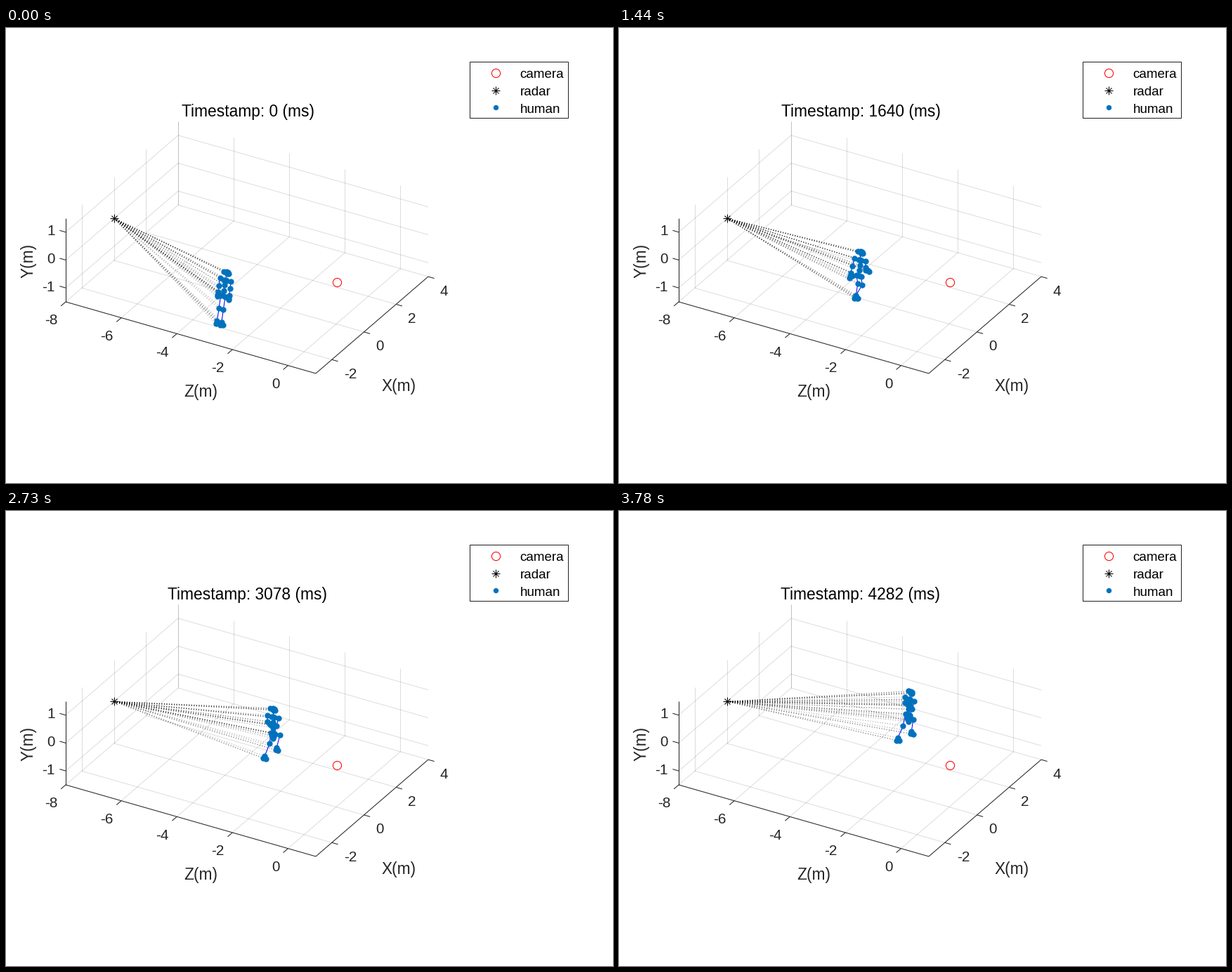
Write a matplotlib script that moves like this. It is 864 by 648 pixels and loops after 3810 ms.

```python
import numpy as np
import matplotlib
import matplotlib.pyplot as plt
from matplotlib.animation import FuncAnimation
from matplotlib.collections import LineCollection
from matplotlib.patches import Rectangle

matplotlib.rcParams["font.family"] = "Liberation Sans"

W, H = 864, 648
FRAMES, INTERVAL = 127, 30
INK, BLUE = "#262626", "#0072BD"

# Screen pixels per metre along the axes of the plot
FWD = np.array([22.86, -19.7])     # X
SIDE = np.array([39.55, 11.33])    # Z
RISE = np.array([0.0, -39.7])      # Y
DOWN = np.array([-5.0, 39.0])      # body axis, slightly tilted
CORNER = np.array([85.0, 390.0])

fig = plt.figure(figsize=(W / 72, H / 72), dpi=72, facecolor="white")
ax = fig.add_axes([0, 0, 1, 1])
ax.set_xlim(0, W)
ax.set_ylim(H, 0)
ax.axis("off")


def project(x, y, z):
    return CORNER + (z + 8) * SIDE + (x + 3) * FWD + (y + 1.5) * RISE


def lines(segments, color, width=1.04, **kw):
    return ax.add_collection(LineCollection(segments, colors=color, linewidths=width, **kw))


def label(x, y, text, size=20.8, color=INK, **kw):
    return ax.text(x, y, text, fontsize=size, color=color, va="baseline", **kw)


def draw_axes():
    grid, ticks = [], []
    tick_x = SIDE / np.hypot(*SIDE) * 9
    tick_z = -FWD / np.hypot(*FWD) * 9
    for x in (-2, 0, 2, 4):
        grid += [(project(x, -1.5, -8), project(x, -1.5, 1)),
                 (project(x, -1.5, -8), project(x, 1.5, -8))]
        p = project(x, -1.5, 1)
        ticks.append((p, p + tick_x))
        label(p[0] + 17, p[1] + 26.5, str(x))
    for z in (-8, -6, -4, -2, 0):
        grid += [(project(-3, -1.5, z), project(4, -1.5, z)),
                 (project(4, -1.5, z), project(4, 1.5, z))]
        p = project(-3, -1.5, z)
        ticks.append((p, p + tick_z))
        label(p[0] - 12, p[1] + 32.3, str(z), ha="right")
    for y in (-1, 0, 1):
        grid += [(project(-3, y, -8), project(4, y, -8)),
                 (project(4, y, -8), project(4, y, 1))]
        p = project(-3, y, -8)
        ticks.append((p, p - tick_x))
        label(p[0] - 15.5, p[1] + 4.5, str(y), ha="right")
    edges = [(project(-3, -1.5, -8), project(-3, -1.5, 1)),
             (project(-3, -1.5, 1), project(4, -1.5, 1)),
             (project(-3, -1.5, -8), project(-3, 1.5, -8))]
    lines(grid, INK, alpha=0.15, zorder=1)
    lines(edges + ticks, INK, zorder=2)
    label(277, 524.5, "Z(m)", 22.8, ha="center")
    label(559, 516.5, "X(m)", 22.8, ha="center")
    label(39, 331, "Y(m)", 22.8, ha="center", rotation=90, rotation_mode="anchor")


def camera_mark(x, y):
    ax.plot(x, y, "o", ms=12.2, mfc="none", mec="red", mew=1.04, zorder=6)


def radar_mark(x, y):
    ax.plot(x, y, "+", ms=12, mec="black", mew=1.04, zorder=6)
    ax.plot(x, y, "x", ms=8.4, mec="black", mew=1.04, zorder=6)


def draw_legend():
    ax.add_patch(Rectangle((659.5, 47.5), 140, 80, fc="white", ec=INK, lw=1.04, zorder=5))
    camera_mark(696.5, 63.5)
    radar_mark(696.5, 88.5)
    ax.plot(696.5, 113, "o", ms=7.4, color=BLUE, mew=0, zorder=6)
    for name, y in (("camera", 71), ("radar", 96), ("human", 121)):
        label(731.5, y, name, 18.75, "black", zorder=6)


# The walk: pelvis x, y, head x, y and ankle drop in metres at some ticks
TICKS = np.array([0, 16, 36, 62, 92, 106, 128], float)
WALK = np.array([
    [309, 381, 314, 349, 0.94],
    [312, 380, 313, 348, 0.93],
    [330, 364, 334, 332, 0.88],
    [353, 341, 353, 308, 0.75],
    [380, 316, 380, 283, 0.76],
    [390, 300, 392, 269, 0.82],
    [411, 289, 415, 259, 0.74],
])
SLOPE = np.gradient(WALK, TICKS, axis=0)
SLOPE[0] = 0
STRIDE = 33       # ticks in one gait cycle
LIFT_OFF = 0.5    # share of the cycle a foot stays on the ground


def smooth(u):
    u = min(max(u, 0.0), 1.0)
    return u * u * (3 - 2 * u)


def along_walk(k):
    i = min(np.searchsorted(TICKS, k, side="right") - 1, len(TICKS) - 2)
    d = TICKS[i + 1] - TICKS[i]
    u = (k - TICKS[i]) / d
    s = smooth(u)
    return ((1 - s) * WALK[i] + s * WALK[i + 1]
            + d * u * (1 - u) * ((1 - u) * SLOPE[i] - u * SLOPE[i + 1]))


def step(p):
    """Forward reach (-1..1) and lift (0..1) of a foot at gait phase p."""
    p %= 1
    if p < LIFT_OFF:
        return 1 - 2 * p / LIFT_OFF, 0.0
    q = (p - LIFT_OFF) / (1 - LIFT_OFF)
    return 2 * smooth(q ** 0.8) - 1, np.sin(np.pi * q ** 0.85)


def leg(pelvis, drop, phase, sign, stride, raise_):
    reach, lift = step(phase)
    f = 0.29 * reach * stride - 0.03
    d = drop - 0.28 * lift * raise_ - 0.02
    hip = pelvis + sign * 0.08 * SIDE + 0.02 * DOWN
    dist = np.hypot(f, d)
    bend = np.sqrt(max(0.41 ** 2 - dist ** 2 / 4, 0))
    knee = hip + (f / 2 + bend * d / dist) * FWD + (d / 2 - bend * f / dist) * DOWN
    ankle = hip + f * FWD + d * DOWN
    heel = ankle - 0.06 * FWD + 0.06 * DOWN
    toe = ankle + 0.13 * FWD + 0.17 * DOWN
    return [hip, knee, ankle, heel, toe]


def arm(shoulder, swing, stride, sign, side):
    upper = -0.05 + 0.3 * swing
    fore = 0.25 * stride + 0.65 * swing

    def move(p, angle, length):
        return p + length * (np.sin(angle) * FWD + np.cos(angle) * DOWN)

    elbow = move(shoulder, upper, 0.26)
    wrist = move(elbow, fore, 0.24)
    hand = move(wrist, fore, 0.1)
    tip = move(hand, fore, 0.06)
    thumb = move(wrist, fore, 0.08) - sign * 0.09 * side
    return [shoulder, elbow, wrist, hand, tip, thumb]


def body(k):
    """Joint points and bones at tick k."""
    state = along_walk(k)
    pelvis, head, drop = state[:2], state[2:4], state[4]
    stride = smooth((k - 10) / 24)
    raise_ = smooth((k - 10) / 8)
    phase = (k - 62) / STRIDE
    yaw = 0.25 * smooth((k - 106) / 22)
    side = np.cos(yaw) * SIDE - np.sin(yaw) * FWD

    navel, chest, neck = (pelvis + u * (head - pelvis) for u in (0.22, 0.46, 0.7))
    joints = [pelvis, navel, chest, neck, head]
    bones = list(zip(joints, joints[1:]))

    face = [head + s * side + f * FWD + d * DOWN
            for s, f, d in ((-0.11, 0, -0.02), (-0.03, 0.05, -0.02),
                            (0.03, 0.05, 0), (0.0, 0.06, 0.05), (0.07, 0, 0))]
    joints += face
    bones += [(head, p) for p in face]

    for sign in (-1, 1):
        turn = phase + (0.5 if sign < 0 else 0)
        limb = leg(pelvis, drop, turn, sign, stride, raise_)
        joints += limb
        bones += [(pelvis, limb[0]), (limb[0], limb[1]), (limb[1], limb[2]),
                  (limb[2], limb[3]), (limb[2], limb[4])]

        collar = neck + sign * 0.05 * side + 0.02 * DOWN
        swing = -np.cos(2 * np.pi * turn) * stride
        limb = arm(neck + sign * 0.2 * side, swing, stride, sign, side)
        joints += [collar] + limb
        bones += [(neck, collar), (collar, limb[0])]
        bones += list(zip(limb[:4], limb[1:5])) + [(limb[2], limb[5])]
    return np.array(joints), bones


RADAR = project(0, 0, -8) + (0.7, 0)

draw_axes()
draw_legend()
radar_mark(*RADAR)
camera_mark(*(project(0, 0, 0) + (0.9, 0.5)))
title = label(344, 126, "", 22.8, "black", ha="center")
rays = lines([], "black", alpha=0.42, linestyles=[(0, (1, 2.4))], zorder=3)
skeleton = lines([], "blue", zorder=4)
dots, = ax.plot([], [], "o", ms=8.3, color=BLUE, mew=0, zorder=5)


def update(i):
    k = i + (i > 7) + (i > 115)
    joints, bones = body(k)
    title.set_text(f"Timestamp: {int(np.ceil(33.45 * k))} (ms)")
    rays.set_segments([(RADAR, p) for p in joints])
    skeleton.set_segments(bones)
    dots.set_data(joints[:, 0], joints[:, 1])
    return title, rays, skeleton, dots


anim = FuncAnimation(fig, update, frames=FRAMES, interval=INTERVAL,
                     repeat=True, repeat_delay=0, blit=False)
plt.show()
```
